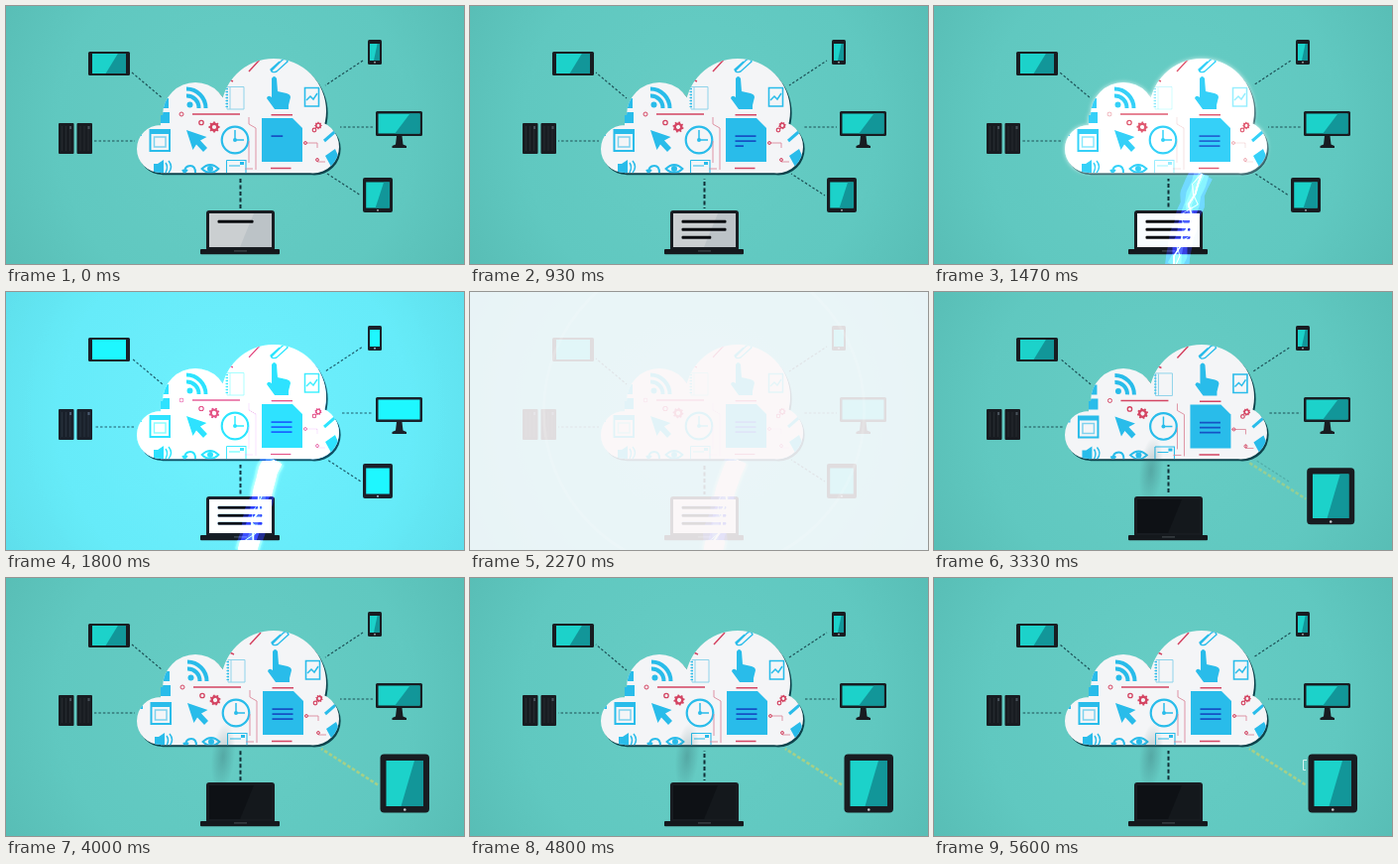
Recreate the animation shown at these times as an HTML page with a canvas. Size 462x260 px, loop 5.67 s.

```html
<!DOCTYPE html>
<html lang="en">
<head>
<meta charset="utf-8">
<title>Cloud transfer</title>
<style>
html, body { margin: 0; width: 100%; height: 100%; overflow: hidden; background: #62c8c1; }
canvas { display: block; width: 100%; height: 100%; }
</style>
</head>
<body>
<canvas id="stage" width="462" height="260"></canvas>
<script>
const W = 462, H = 260, LOOP = 5670, STEP = 67;
const BLUE = '#29bcea', RED = '#d44563', DARK = '#181c21', PAPER = '#f4f5f7';
const c = document.getElementById('stage').getContext('2d');

const ramp = (t, a, b) => Math.max(0, Math.min(1, (t - a) / (b - a)));
const ease = p => 1 - (1 - p) ** 3;
const mix = (a, b, p) => a + (b - a) * p;
const noise = n => { const v = Math.sin(n * 127.1) * 43758.5453; return v - Math.floor(v) - 0.5; };

function rect(x, y, w, h, fill, r = 0) {
  c.fillStyle = fill;
  c.beginPath();
  c.roundRect(x, y, w, h, r);
  c.fill();
}
function dot(x, y, r, color) {
  c.fillStyle = color;
  c.beginPath();
  c.arc(x, y, r, 0, 7);
  c.fill();
}
function fill(d, color) {
  c.fillStyle = color;
  c.fill(new Path2D(d));
}
function stroke(d, color, width = 1) {
  c.strokeStyle = color;
  c.lineWidth = width;
  c.stroke(new Path2D(d));
}
function ring(x, y, r, color, width) {
  c.strokeStyle = color;
  c.lineWidth = width;
  c.beginPath();
  c.arc(x, y, r, 0, 7);
  c.stroke();
}
function dashes(x1, y1, x2, y2, t, color = '#1c4f55', width = 1.2, dash = [2.5, 2]) {
  c.save();
  c.setLineDash(dash);
  c.lineDashOffset = -t / 300;
  stroke(`M${x1} ${y1}L${x2} ${y2}`, color, width);
  c.restore();
}
function device(x, y, w, h, bx, by, shade, r = 1.5) {
  rect(x, y, w, h, DARK, r);
  x += bx; y += by; w -= 2 * bx; h -= 2 * by;
  rect(x, y, w, h, '#1cd2ca');
  fill(`M${x + w * .76} ${y}H${x + w}V${y + h}H${x + w * .4}Z`, `rgba(18,150,153,${shade})`);
}
function gear(x, y, r, angle) {
  c.save();
  c.translate(x, y);
  c.rotate(angle);
  ring(0, 0, r * .55, RED, r * .4);
  for (let i = 0; i < 8; i++) {
    c.rotate(Math.PI / 4);
    rect(r * .6, -r * .15, r * .32, r * .3, RED);
  }
  c.restore();
}

const cloud = new Path2D();
for (const [x, y, r] of [[156, 144, 24], [191, 110, 33], [270, 106, 53], [309.5, 142, 26.5]]) {
  cloud.moveTo(x + r, y);
  cloud.arc(x, y, r, 0, Math.PI * 2);
}
cloud.rect(156, 110, 154, 58.3);

function drawIcons(t, bloom) {
  // feed
  dot(185.5, 99.5, 3, BLUE);
  stroke('M182 90.5A12 12 0 0 1 194.5 103M182 83.5A19.5 19.5 0 0 1 201.5 103', BLUE, 4);

  // window and left edge pieces
  rect(144.5, 124, 21.5, 23, BLUE);
  rect(146.5, 129, 17.5, 16, PAPER);
  stroke('M149.5 132H161V142H149.5Z', '#7fd2ee', 1.5);
  rect(132, 121, 5, 10, BLUE);
  rect(158, 93, 6, 10, BLUE);
  rect(154, 107, 11, 11, BLUE);

  // pointer, hand, paperclip
  fill('M182 125L202.5 132L196 135.5L203 143L199 147L192 139.5L188.5 145Z', BLUE);
  fill('M268 73q2.5-4 5 0l1 13l9 2q4 1 4 4l-2 8v4H271l-8-11q1-4 5-1Z', BLUE);
  stroke('M268 65L279 54q4-2 5 2L273 66q-5 2-6-2L276 56', BLUE, 1.4);

  // clock
  ring(231, 135, 13.3, BLUE, 2.2);
  stroke('M231 125V135H240', BLUE, 1.5);
  dot(231, 135, 2, BLUE);

  // bottom row
  fill('M149 159h4l6-4v13h-10Z', BLUE);
  stroke('M161 158q3 4 0 10M164 156q5 6 0 12', BLUE, 1.5);
  stroke('M180 168q0-7 6-7q5 0 5 7M178 165l2 3l3-3', BLUE, 2);
  stroke('M197.5 164q8.5-8 17 0q-8.5 8-17 0Z', BLUE, 1.8);
  dot(206, 164, 3, BLUE);

  // right edge pieces
  fill('M322 151L332 144L338 158L328 162Z', BLUE);
  stroke('M321 136L336 123', BLUE, 3);

  // fine outlines fade in the glare
  c.globalAlpha = 1 - bloom * .5;
  stroke('M223 81.5H240V104H223ZM226 82V104', '#8fd3ea', 1);
  for (let y = 83; y < 104; y += 3) rect(221.5, y, 2.5, 1, BLUE);
  stroke('M301.5 82.5H315.5V101H301.5Z', BLUE, 1.6);
  stroke('M303 95l4-4l3 3l4-6', BLUE, 1.5);
  stroke('M222.5 155.5H242V168M222.5 155.5V168M225 161H236', BLUE, 1.1);
  rect(236, 157, 4, 3, BLUE);
  stroke('M245 112V119L252 123V165M245 136V158M241 164H249M300 138H314V143M314 153V157H322', '#dc8a9b', .9);
  ring(302, 138, 1.5, RED, .9);
  ring(314, 155, 1.5, RED, .9);
  ring(177, 109, 2, RED, 1);
  c.globalAlpha = 1;

  gear(210, 122, 6, t / 900);
  gear(315, 120.5, 4, -t / 900);
  ring(197, 117.5, 2.2, RED, 1.3);
  ring(311, 125, 1.8, RED, 1.2);
  stroke('M188 109H236M267.5 109.7H289M267 163.5H287.5M245 66L256 54M218 71L229 76', RED, 1.5);
}

function drawFile(lines) {
  fill('M258 113H289L299 123V157H258Z', BLUE);
  for (let i = 0; i < 3; i++) {
    const p = ramp(lines, i + .3, i + 1.2);
    if (p > 0) rect(267.5, 130.2 + i * 5, 21 * p, 1.8, '#1552c4');
  }
}

function drawCloud(t, bloom, lines) {
  c.save();
  c.translate(1.6, 2);
  c.fillStyle = '#0d434c';
  c.fill(cloud);
  c.restore();

  c.save();
  c.shadowColor = `rgba(255,255,255,${bloom * .8})`;
  c.shadowBlur = bloom * 4;
  c.fillStyle = PAPER;
  c.fill(cloud);
  c.shadowColor = 'transparent';
  c.clip(cloud);
  c.save();
  const drift = ramp(t, 2800, 4000);
  c.translate(drift, drift);
  drawIcons(t, bloom);
  drawFile(lines);
  c.restore();
  c.globalCompositeOperation = 'lighter';
  rect(0, 0, W, H, `rgba(12,20,14,${bloom})`);
  c.restore();
}

function drawLaptop(on, lit, lines) {
  rect(202, 206, 69, 41, DARK, 3);
  rect(196, 245, 80, 5.2, '#14181c', 1);
  if (on) {
    const v = mix(207, 252, lit);
    rect(205, 209, 63, 34, `rgb(${v - 4},${v},${v + 2})`);
    fill('M250 209H268V243H236Z', `rgba(160,173,180,${.35 * (1 - lit)})`);
    for (let i = 0; i < 3; i++) {
      const p = ramp(lines, i, i + 1);
      if (p > 0) rect(213.5, 215.7 + i * 8, 45 * p, 3, '#0b0d10', 1);
    }
  } else {
    rect(205, 209, 63, 34, '#0e1115');
    fill('M250 209H268V243H236Z', '#14181c');
  }
  rect(230, 246.3, 13, 1.2, '#41484d');
}

function drawDevices(t, shade) {
  device(83, 46, 42, 24, 4, 2, shade);
  device(365, 34, 14, 25, 2, 4, shade);
  rect(371, 56, 2, 1.5, '#8a9396');

  for (const x of [53, 71.5]) {
    rect(x, 118, 15.5, 31, DARK, 1);
    for (let i = 0; i < 3; i++) rect(x + 3 + i * 4, 121, 1, 25, '#262b30');
    rect(x + 11, 121, 2, 3, '#48515a');
  }

  device(373, 106, 47, 25, 2.5, 2.5, shade);
  fill('M394 131H399.5L400.5 139.5L404 141V143H389.5V141L393 139.5Z', DARK);

  const g = ease(ramp(t, 3100, 3500));
  const x = mix(360, 377.5, g), y = mix(173, 177.5, g), w = mix(30, 49.5, g), h = mix(35, 59, g);
  device(x, y, w, h, mix(3.2, 6, g), mix(4.5, 6.5, g), shade, mix(2, 4, g));
  dot(x + w / 2, y + h - mix(2.2, 3, g), mix(.9, 1.3, g), '#c5cbcd');

  const b = ramp(t, 5300, 5500);
  if (b) stroke(`M376 183.5H372.5V${183.5 + 10 * b}H375`, '#d9f3ef', 1);
}

function drawLinks(t) {
  dashes(89, 136, 130, 136, t);
  dashes(127, 67, 158, 93, t);
  dashes(360, 55, 322, 80, t);
  dashes(370, 122, 337, 122, t);
  dashes(236.5, 174, 236.5, 204, t, '#102f36', 2, [4, 2.5]);
  const g = ramp(t, 3100, 3400);
  c.globalAlpha = 1 - g;
  dashes(324, 169, 358, 191, t);
  c.globalAlpha = g;
  dashes(318, 172, 375, 208.5, t * 4, '#a6d088', 2.6, [3.5, 2]);
  c.globalAlpha = 1;
}

function boltPath(seed, spread) {
  let d = 'M270 169';
  for (let i = 1; i <= 9; i++) {
    const p = i / 9;
    d += `L${270 - 26 * p ** .8 + noise(seed + i) * spread} ${169 + 93 * p}`;
  }
  return d;
}

// White beam that passes behind the laptop
function drawBeam(t) {
  const power = ramp(t, 1550, 1800) * (1 - ramp(t, 2330, 2420));
  if (!power) return;
  c.save();
  c.shadowColor = '#fff';
  c.shadowBlur = 5;
  stroke(boltPath(Math.floor(t / STEP), 3), `rgba(255,255,255,${power})`, 19);
  c.restore();
}

function drawBolt(t) {
  const power = ramp(t, 1330, 1450) * (1 - ramp(t, 2330, 2420));
  if (!power) return;
  const tick = Math.floor(t / STEP);
  c.save();
  c.globalCompositeOperation = 'lighter';
  c.globalAlpha = power;
  c.lineJoin = 'round';
  stroke(boltPath(tick, 4), 'rgba(35,40,240,.35)', 24);
  stroke(boltPath(tick + 20, 5), 'rgba(50,60,255,.45)', 15);
  stroke(boltPath(tick + 30, 6), 'rgba(90,120,255,.35)', 6);
  stroke(boltPath(tick + 40, 9), 'rgba(215,235,255,.8)', 1.6);
  stroke(boltPath(tick + 60, 16), 'rgba(190,220,255,.6)', 1);
  c.restore();
}

function drawFlash(t, gain, fade) {
  if (gain) {
    c.globalCompositeOperation = 'color-dodge';
    rect(0, 0, W, H, `rgb(${16 * gain},${38 * gain},${58 * gain})`);
    c.globalCompositeOperation = 'source-over';
  }
  const white = ramp(t, 1830, 2320) * fade;
  if (white) {
    rect(0, 0, W, H, `rgba(251,246,247,${white * .98})`);
    ring(236, 120, mix(110, 165, ramp(t, 1830, 2300)), `rgba(255,255,255,${white * .15})`, 3);
  }
}

function drawBackground() {
  const g = c.createRadialGradient(231, 125, 30, 231, 125, 280);
  g.addColorStop(0, '#66ccc4');
  g.addColorStop(.6, '#60c8c0');
  g.addColorStop(1, '#57bcb4');
  rect(0, 0, W, H, g);
}

function drawSmoke() {
  c.save();
  c.translate(219, 180);
  c.rotate(.1);
  c.scale(.35, 1);
  const g = c.createRadialGradient(0, 0, 2, 0, 0, 34);
  g.addColorStop(0, 'rgba(50,95,100,.3)');
  g.addColorStop(1, 'rgba(50,95,100,0)');
  rect(-35, -35, 70, 70, g);
  c.restore();
}

function draw(now) {
  const t = now % LOOP;
  const on = t < 2370;
  const fade = 1 - ramp(t, 2380, 2720);
  const lit = ramp(t, 1270, 1450) * fade;
  const bloom = lit * (1 - .8 * ramp(t, 1500, 1780));
  const gain = ramp(t, 1500, 1800) * fade;
  const lines = .8 + 2.4 * ramp(t, 0, 1200);
  drawBackground();
  drawLinks(t);
  drawDevices(t, 1 - gain);
  drawBeam(t);
  drawCloud(t, bloom, lines);
  if (!on) drawSmoke();
  drawLaptop(on, lit, lines);
  drawBolt(t);
  drawFlash(t, gain, fade);
}

const start = performance.now();
function frame() {
  draw(performance.now() - start);
  requestAnimationFrame(frame);
}
frame();
</script>
</body>
</html>
```
